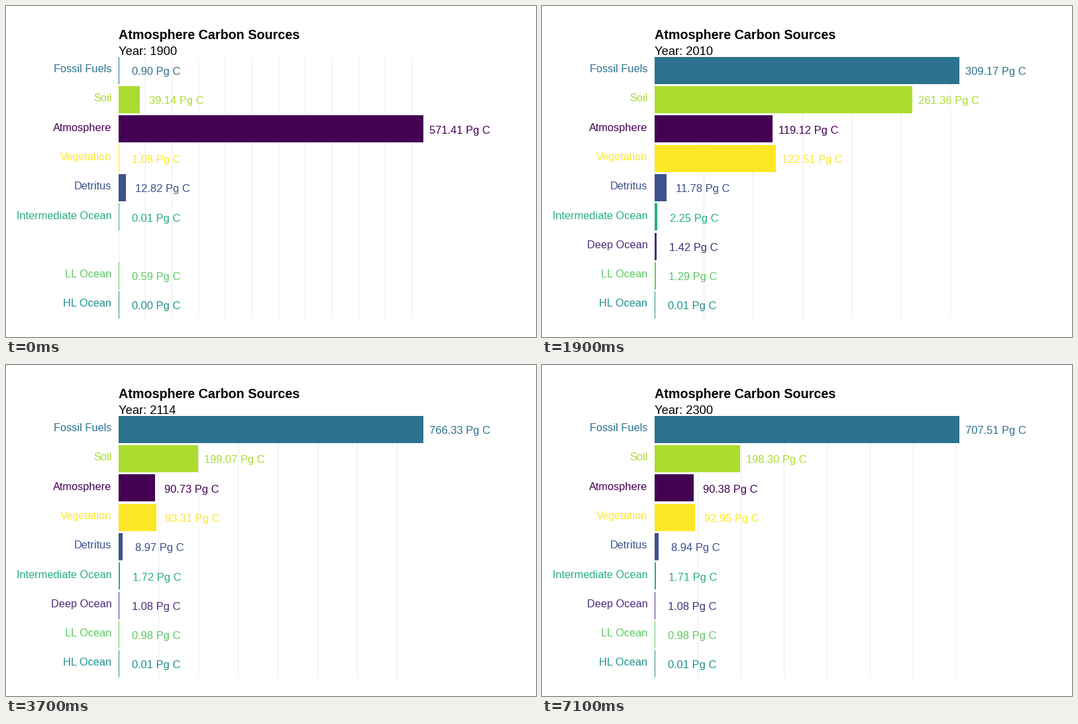
Animation of 800x500 px, one loop 10 s. Source, as a matplotlib script:

```python
import numpy as np
import matplotlib.pyplot as plt
from matplotlib.animation import FuncAnimation
from matplotlib.patches import Rectangle

plt.rcParams["font.family"] = ["Liberation Sans", "DejaVu Sans"]

W, H, DPI = 800, 500, 100
FRAMES, STEPS = 100, 69          # the last year is held after STEPS
FIRST_YEAR, LAST_YEAR = 1900, 2300
LEFT, SPAN = 170, 459.9          # the longest bar always fills SPAN
TOP, PITCH, BAR, BOTTOM = 76.9, 44.28, 41, 472
MIXED, SETTLED = 10, 19          # steps at which the natural pools even out

NAMES = ["Fossil Fuels", "Soil", "Atmosphere", "Vegetation", "Detritus",
         "Intermediate Ocean", "Deep Ocean", "LL Ocean", "HL Ocean"]
# viridis colours follow the alphabetical order of the names
COLORS = {name: plt.cm.viridis(i / 8) for i, name in enumerate(sorted(NAMES))}

# natural pools (Pg C) at the first step, once mixed, and at the end
START = np.array([39.14, 571.41, 1.08, 12.82, 0.01, 0, 0.59, 0.003])
MID = np.array([334.89, 145.00, 139.76, 14.82, 3.57, 2.76, 1.66, 0.02])
END = np.array([198.30, 90.38, 92.95, 8.94, 1.71, 1.08, 0.98, 0.01])

# fossil carbon and the sum of the natural pools at a few steps
KNOTS = np.array([0, MIXED, SETTLED, 30, 45, 59, STEPS])
FOSSIL = [0.90, 29.11, 309.17, 796.06, 730.01, 741.83, 707.51]
NATURAL = [START.sum(), MID.sum(), 519.75, 378.35, 417.32, 411.59, END.sum()]


def monotone_curve(x, y):
    """Smooth curve through the points without overshoot."""
    y = np.array(y)
    d = np.diff(y) / np.diff(x)
    slope = np.zeros(len(x))
    for i, (a, b) in enumerate(zip(d, d[1:]), 1):
        slope[i] = 2 * a * b / (a + b) if a * b > 0 else 0
    slope[0] = 1.5 * d[0] - 0.5 * slope[1]
    slope[-1] = 1.5 * d[-1] - 0.5 * slope[-2]

    def at(t):
        i = min(np.searchsorted(x, t, side="right"), len(x) - 1) - 1
        h = x[i + 1] - x[i]
        u = (t - x[i]) / h
        v = 1 - u
        return (v * v * ((1 + 2 * u) * y[i] + u * h * slope[i])
                + u * u * ((1 + 2 * v) * y[i + 1] - v * h * slope[i + 1]))
    return at


fossil = monotone_curve(KNOTS, FOSSIL)
natural = monotone_curve(KNOTS, NATURAL)


def carbon(step):
    start, mid, end = (pool / pool.sum() for pool in (START, MID, END))
    fresh = max(0, 1 - step / MIXED) ** 5
    u = np.clip((step - MIXED) / (SETTLED - MIXED), 0, 1)
    late = u * u * (3 - 2 * u)
    share = mid + (start - mid) * fresh + (end - mid) * late
    return np.append(fossil(step), natural(step) * share)


fig = plt.figure(figsize=(W / DPI, H / DPI), dpi=DPI, facecolor="white")
ax = fig.add_axes([0, 0, 1, 1])
ax.set_xlim(0, W)
ax.set_ylim(H, 0)
ax.axis("off")


def write(x, y, text, px, **style):
    return ax.text(x, y, text, fontsize=px * 72 / DPI, va="baseline", **style)


write(LEFT, 50, "Atmosphere Carbon Sources", 19.75, weight="bold")
year_text = write(LEFT, 74, "", 18.4)

grid = [ax.plot([], [], color="#EBEBEB", lw=72 / DPI, antialiased=False,
                solid_capstyle="butt", zorder=1)[0] for _ in range(13)]

rows = []
for k, name in enumerate(NAMES):
    y, color = TOP + PITCH * k, COLORS[name]
    bar = Rectangle((LEFT, round(y)), 1, BAR, fc=color, lw=0,
                    antialiased=False, zorder=2)
    ax.add_patch(bar)
    label = write(159.5, y + 23.3, name, 16.35, color=color, ha="right")
    value = write(0, y + 27.3, "", 16.45, color=color, zorder=3)
    rows.append((bar, label, value))


def draw(frame):
    step = min(frame, STEPS)
    year = FIRST_YEAR + (LAST_YEAR - FIRST_YEAR) * step / STEPS
    year_text.set_text(f"Year: {year:.0f}")

    amounts = carbon(step)
    top = amounts.max()
    scale = SPAN / top

    gap = 50 if top < 600 else 100
    for n, line in enumerate(grid):
        x = int(LEFT + n * gap * scale)
        line.set_data([x, x], [77, BOTTOM])
        line.set_visible(n * gap <= top)

    for amount, (bar, label, value) in zip(amounts, rows):
        length = amount * scale
        bar.set_width(int(length + 0.06) + 1)
        number = f"{amount:.2f}"
        # numbers are padded with blanks to six characters
        value.set_x(LEFT + length + 9.5 + 5 * (6 - len(number)))
        value.set_text(f"{number} Pg C")
        for part in (bar, label, value):
            part.set_visible(amount > 0)
    return []


anim = FuncAnimation(fig, draw, frames=FRAMES, init_func=lambda: draw(0),
                     interval=100, repeat=True, repeat_delay=0, blit=False)
plt.show()
```
